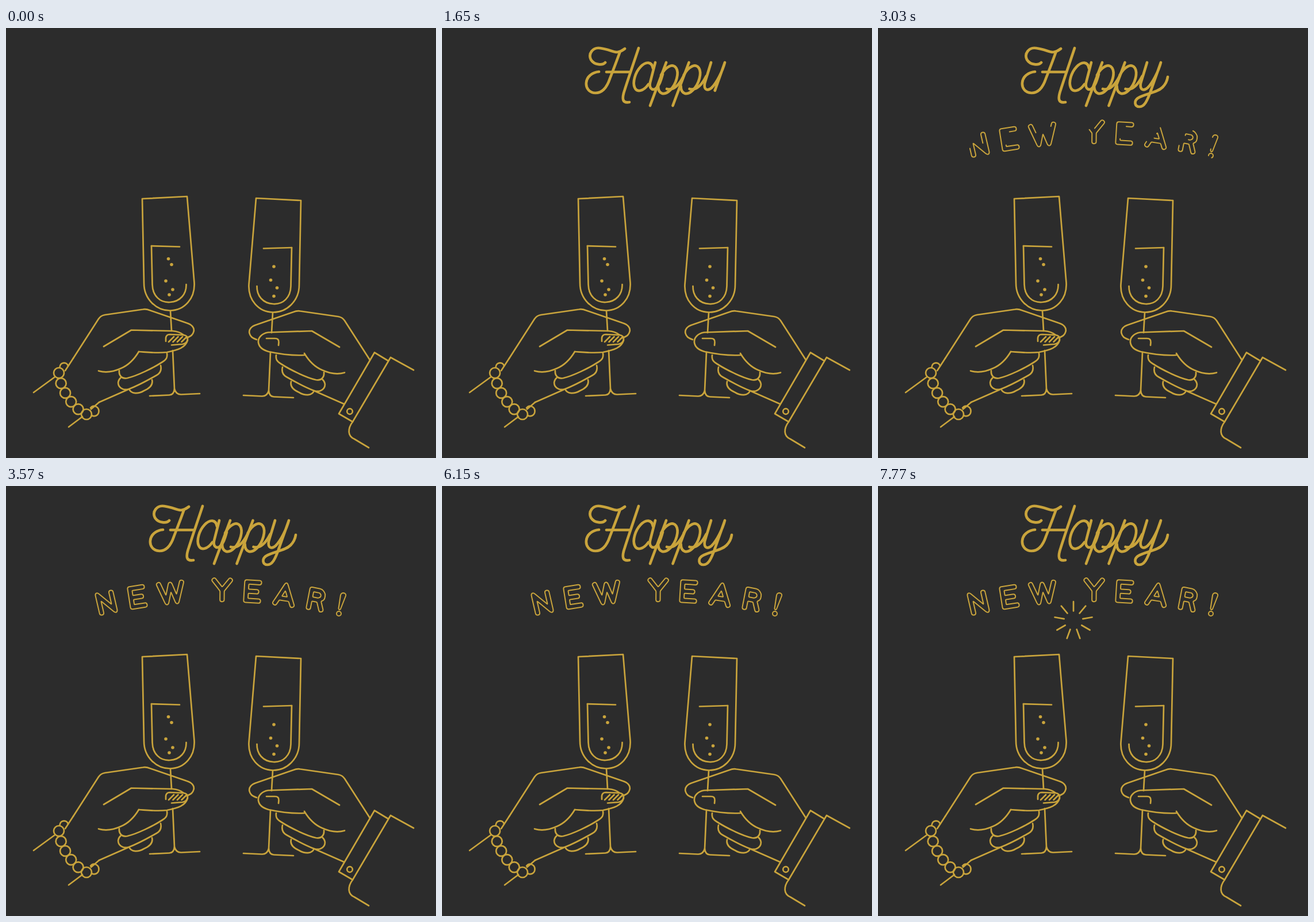
An HTML page for the animation above (8000 ms loop, 748 by 748 pixels).

```html
<!DOCTYPE html>
<html lang="en">
<head>
<meta charset="utf-8">
<title>Happy New Year</title>
<style>
html, body { margin: 0; width: 100%; height: 100%; overflow: hidden; background: #2c2c2c; }
svg { display: block; width: 100vw; height: 100vh; }
</style>
</head>
<body>
<svg id="stage" viewBox="0 0 748 748" fill="none" stroke="#c9a43c" stroke-width="2.7" stroke-linecap="round" stroke-linejoin="round"></svg>
<script>
const LOOP = 8000, TOAST = 4350, CYCLE = 2130;
const stage = document.getElementById('stage');

function add(parent, tag, attrs) {
  const el = document.createElementNS('http://www.w3.org/2000/svg', tag);
  for (const k in attrs) el.setAttribute(k, attrs[k]);
  parent.appendChild(el);
  return el;
}
const group = (parent, attrs = {}) => add(parent, 'g', attrs);
const line = (parent, d) => add(parent, 'path', { d });
const ring = (parent, x, y, r) => add(parent, 'circle', { cx: x, cy: y, r });
const bubble = (parent, x, y) =>
  add(parent, 'circle', { cx: x, cy: y, r: 2.8, fill: '#c9a43c', stroke: 'none' });
const show = (el, on) => el.setAttribute('visibility', on ? 'visible' : 'hidden');
const clamp = v => Math.min(1, Math.max(0, v));

// ---- arms: both share this shape, the right one is mirrored
function arm() {
  const pose = group(stage), body = group(pose);
  [
    // glass, stem and foot
    'M237 297L315 293L327.5 443C329 470 311 491 286 491.5C262 492 240 472 240 444Z',
    'M253 379L254.5 446C255 466 268 478 285 477C303 476 314 463 313.5 446',
    'M286 492L288 527M290 561L293 628',
    'M250 640L284 638.5Q292 638 293 628Q296 638 305 637.5L337 636',
    // back of the hand, palm and wrist
    'M117 574.5L161 506Q165 500 172 499L238 489.5Q244 488.5 250 491L314 513C324 516 328 522 326.5 528C325 534 322 536 314 539',
    'M231 563C222 578 212 587 200 592C187 598 173 600 161 596.5',
    'M212 629L162 651',
    // fingers
    'M280 566C281 573 279 577 272 581C255 592 228 605 211 609C201 611 196 604 197 596',
    'M269 587C271 595 269 600 262 604C248 612 230 622 214 628C198 633 189 617 200 608',
    'M254 612C256 620 252 626 240 631C230 637 218 637 214 628'
  ].forEach(d => line(body, d));
  return { pose, body, surface: line(body, '') };
}

const left = arm(), lb = left.body;
[
  'M170 554L218 525.5L290 527C298 527.5 304 530 309 534',
  'M316 543C312 556 300 560 280 564C262 566 246 564 231 563',
  'M278 545V539Q279 533 285 533L309 534Q316 535 316 541Q315 549 307 550L288 551.5',
  'M48 634L85 607M109 694L133 676M103 596L117 574.5M162 651L148 663',
  'M93.5 590C94 581 106 580 108 588M147 661C152 654 162 659 161.5 667C161 674 154 677 149 674'
].forEach(d => line(lb, d));
for (let i = 0; i < 4; i++) line(lb, `M${283 + i * 7.5} 546l9 -9`);
for (let u = 0; u < 1.1; u += 0.2)
  ring(lb, 92 + 48 * u ** 1.6, 600 + 72 * (1 - Math.max(0, 1 - u) ** 1.3), 9);
[[282.5, 401.5], [288, 411.5], [278, 440], [290, 455], [284, 464]]
  .forEach(([x, y]) => bubble(lb, x, y));

const right = arm(), rb = right.body;
[
  'M170 552L218 524L294 526.5C304 528 312 535 311 544C310 552 304 557 293 560C270 565 250 567 231 566',
  'M297 537H282Q275 537 275.5 544L276 549',
  'M85 576L109 561.5L171 668L147 682',
  'M41 592L81 570L147 682C156 694 156 707 144 712L119 727'
].forEach(d => line(rb, d));
ring(rb, 152, 664, 4.8);
[[284, 412], [289.5, 435.5], [278.5, 449], [284, 463.5]].forEach(([x, y]) => bubble(rb, x, y));

// ---- sparks: rays 40 degrees apart
function rays(x, y, count, start, r0, r1) {
  let d = '';
  for (let i = 0; i < count; i++) {
    const a = (start + i * 40) * Math.PI / 180, c = Math.cos(a), s = Math.sin(a);
    d += `M${x + c * r0} ${y + s * r0}L${x + c * r1} ${y + s * r1}`;
  }
  return line(stage, d);
}
const burst = (x, y, r) => rays(x, y, 9, -90, r / 2, r);
const clinkMarks = [
  rays(374, 314.5, 4, -150, 14.5, 21),
  line(stage, 'M311 398A4 4 0 1 0 313 392.5')
];
// burst, start and end inside one toast cycle
const bursts = [
  [burst(341, 269, 19), 450, 1200],
  [burst(221, 238, 19), 720, 1200],
  [burst(404, 265, 26), 900, 1200],
  [burst(340, 234, 33), 1290, 1800]
];

// ---- script word, written stroke after stroke
const traces = [];
function trace(el, from, to) {
  el.setAttribute('pathLength', 1);
  traces.push({ el, from, to });
}
const script = group(stage, { 'stroke-width': 4.7 });
function write(from, to, list) {
  const els = list.map(d => line(script, d));
  const lens = els.map(el => el.getTotalLength());
  const rate = (to - from) / lens.reduce((a, b) => a + b);
  els.forEach((el, i) => trace(el, from, from += lens[i] * rate));
}
const p = x => [
  `M${x} 60l-28 75`,
  `M${x - 9} 82A26 14 -65 1 1 ${x - 14} 101`,
  `M${x + 1} 106c11 3 21 -6 29 -22`
];
write(25, 830, [
  'M284 60C280 65 265 65 259 55C254 45 262 33 275 35C290 37 298 42 304 42C310 42 314 39 318 36',
  'M309 43C303 60 297 75 292 88C287 103 279 113 267 113C256 113 250 104 251 95C252 84 262 77 273 76',
  'M342 35C333 62 325 85 318 107C312 124 314 131 326 129',
  'M286 76.5H326'
]);
write(830, 1650, [
  'M367 70A26 14 -65 1 0 359 98',
  'M371 60L362 95C360 104 365 109 371 106C378 101 381 91 384 80',
  ...p(390), ...p(429.5),
  'M468 60L457 96C455 108 462 110 469 104C478 95 488 75 492 60L475 108'
]);
write(1650, 1790, [
  'M475 108C468 128 463 137 455 137C446 137 445 127 452 122C465 114 485 113 495 103C500 98 503 92 504 85'
]);

// ---- outlined letters, all drawn at once
const caps = group(stage, { 'stroke-width': 2 });
const HALF = 3.7;
const capTrace = (parent, d) => trace(line(parent, d), 1820, 3570);

// Walks around a skeleton of nodes and edges at a fixed distance; one corner list per side.
function contours(nodes, edges) {
  const half = edges.flatMap(([a, b]) => [[a, b], [b, a]]);
  const dir = ([a, b]) => {
    const x = nodes[b][0] - nodes[a][0], y = nodes[b][1] - nodes[a][1], l = Math.hypot(x, y);
    return [x / l, y / l];
  };
  const angle = e => Math.atan2(dir(e)[1], dir(e)[0]);
  const next = e => {
    const back = angle([e[1], e[0]]);
    const gap = o => o[1] === e[0] ? 7 : (back - angle(o) + 4 * Math.PI) % (2 * Math.PI);
    return half.filter(o => o[0] === e[1]).sort((a, b) => gap(a) - gap(b))[0];
  };
  const seen = new Set(), result = [];
  for (const first of half) {
    if (seen.has(first)) continue;
    const [sx, sy] = dir(first), [ax, ay] = nodes[first[0]], [bx, by] = nodes[first[1]];
    const pts = [[ax + (bx - ax) * 0.6 - sy * HALF, ay + (by - ay) * 0.6 + sx * HALF, 0]];
    for (let e = first; !seen.has(e); e = next(e)) {
      seen.add(e);
      const [x, y] = nodes[e[1]], [ux, uy] = dir(e), [vx, vy] = dir(next(e));
      const dot = ux * vx + uy * vy, cross = ux * vy - uy * vx;
      if (dot < -0.05 && cross < 1e-6) {
        pts.push([x + HALF * (ux - uy), y + HALF * (uy + ux), HALF]);
        pts.push([x - HALF * (vx + vy), y + HALF * (vx - vy), HALF]);
      } else {
        const k = HALF / (1 + dot);
        pts.push([x - (uy + vy) * k, y + (ux + vx) * k, cross < 0 ? HALF : 1.2]);
      }
    }
    result.push(pts);
  }
  return result;
}
// Closed path with soft corners; the first point only marks the pen start.
function soft(pts) {
  const toward = (a, b) => {
    const dx = b[0] - a[0], dy = b[1] - a[1], l = Math.hypot(dx, dy) || 1;
    const k = Math.min(a[2], l / 2) / l;
    return `${a[0] + dx * k} ${a[1] + dy * k}`;
  };
  let d = `M${pts[0][0]} ${pts[0][1]}`;
  for (let i = 1; i < pts.length; i++) {
    const q = pts[i];
    d += `L${toward(q, pts[i - 1])}Q${q[0]} ${q[1]} ${toward(q, pts[(i + 1) % pts.length])}`;
  }
  return d + 'Z';
}
// Edges are pairs of node digits; the pen starts on the first pair.
function letter(x, y, turn, nodes, pairs) {
  const g = group(caps, { transform: `translate(${x} ${y}) rotate(${turn})` });
  const edges = pairs.split(' ').map(s => [+s[0], +s[1]]);
  contours(nodes, edges).forEach(pts => capTrace(g, soft(pts)));
}
const E = [[-11, -16], [11, -16], [-11, 0], [7, 0], [-11, 16], [11, 16]];
letter(174.5, 203, -13, [[-12, -15.5], [-12, 15.5], [12, 15.5], [12, -15.5]], '01 02 23');
letter(228.5, 193, -9, E, '01 02 23 24 45');
letter(287, 185, -6, [[-9, 16], [-20, -15.5], [0, -13], [9, 16], [20, -15.5]], '01 02 23 34');
letter(376, 181, 0.5, [[-14, -17], [0, 0.5], [14, -17], [0, 16.5]], '01 12 13');
letter(429, 183.5, 3.5, E, '01 02 23 24 45');
letter(485, 189.5, 8.5, [[-10.5, 6.5], [-15, 16], [0, -16], [10.5, 6.5], [15, 16]], '01 02 23 30 34');
letter(540, 197.5, 11, [[-11, 0.5], [-11, 16], [-11, -16], [5, -16], [10, -11], [10, -4], [4, 0.5], [11, 16]],
  '01 02 23 34 45 56 60 67');
capTrace(caps, 'M582 190Q583 186 587 186Q592 187 591 191L582 214Q579 217 578.5 213Z');
capTrace(caps, 'M575 222A4 4 0 0 1 583 222A4 4 0 0 1 575 222Z');

// ---- picture at time t
function draw(t) {
  for (const { el, from, to } of traces) {
    const k = clamp((t - from) / (to - from));
    show(el, k > 0);
    el.setAttribute('stroke-dasharray', k < 1 ? `${k} 2` : 'none');
  }
  const beat = t < TOAST ? -1 : (t - TOAST) % CYCLE;
  const clink = beat >= 0 && beat < 210;
  right.pose.setAttribute('transform', `translate(${clink ? '748 0' : '750 3'}) scale(-1 1)`);
  for (const { body, surface } of [left, right]) {
    body.setAttribute('transform', clink ? 'translate(47 612) rotate(10.1) translate(-48 -634)' : '');
    surface.setAttribute('d', `M253 379L302 ${clink ? 366.5 : 380.5}`);
  }
  clinkMarks.forEach(el => show(el, clink));
  for (const [el, on, off] of bursts) show(el, beat >= on && beat < off);
}
function frame() {
  draw(performance.now() % LOOP);
  requestAnimationFrame(frame);
}
frame();
</script>
</body>
</html>
```
